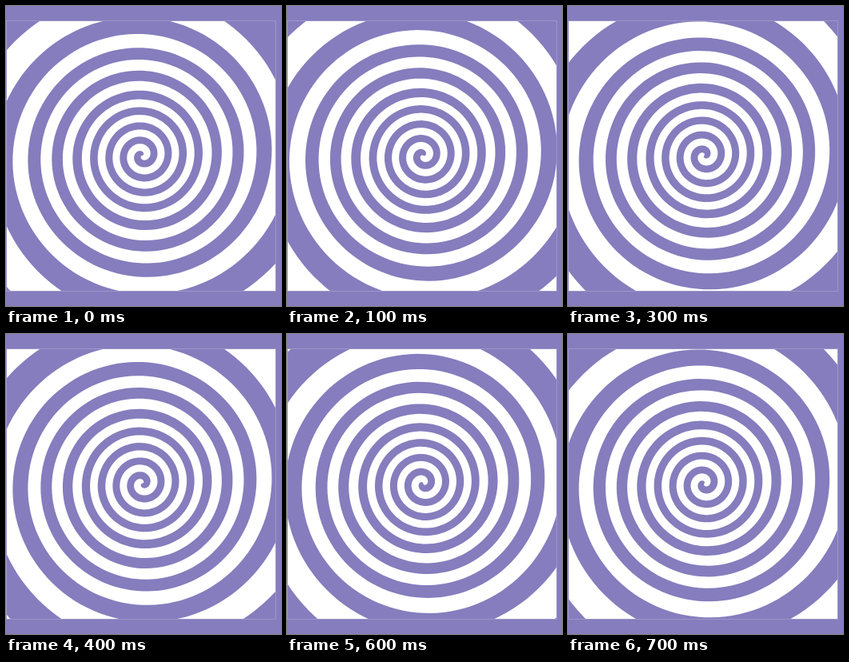
An HTML page with a canvas for the animation above (800 ms loop, 344 px wide and 375 px high).

```html
<!DOCTYPE html>
<html lang="en">
<head>
<meta charset="utf-8">
<title>Spiral</title>
<style>
  html, body { margin: 0; height: 100%; overflow: hidden; background: #857dbd; }
  canvas { display: block; }
</style>
</head>
<body>
<canvas id="stage" width="344" height="375"></canvas>
<script>
const ctx = document.getElementById('stage').getContext('2d');
const PURPLE = '#857dbd', LINE = '#9d97c8';
const CX = 170.4, CY = 186.9, LOOP = 800, STEP = 100, END = 17;

// Radius of the spiral edge after each half turn
const radii = [0, 9.9, 18.9, 27.9, 36.9, 46, 55.6, 65.2, 75.5, 87, 99.4,
  113, 127, 142.9, 161.9, 186.3, 224, 278, 340];

// Smooth interpolation between the half-turn radii
function radius(u) {
  const i = Math.min(Math.floor(u), END - 1), f = u - i;
  const a = i ? radii[i - 1] : -radii[1], b = radii[i], c = radii[i + 1], d = radii[i + 2];
  return b + f / 2 * (c - a + f * (2 * a - 5 * b + 4 * c - d + f * (3 * (b - c) + d - a)));
}

function edgePoint(u, turn) {
  const r = radius(u), angle = turn - Math.PI * u;
  ctx.lineTo(CX + r * Math.cos(angle), CY + r * Math.sin(angle));
}

function draw(t) {
  ctx.fillStyle = PURPLE;
  ctx.fillRect(0, 0, 344, 375);
  ctx.save();
  ctx.beginPath();
  ctx.rect(0, 18, 338, 339);
  ctx.clip();
  ctx.fillStyle = '#fff';
  ctx.fillRect(0, 18, 338, 339);

  const turn = Math.PI * (1 + 2 * t), n = END * 60;
  const last = turn - Math.PI * END;
  ctx.beginPath();
  for (let i = 0; i <= n; i++) edgePoint(i / 60, turn);
  ctx.arc(CX, CY, radius(END), last, last + Math.PI);
  for (let i = n; i >= 0; i--) edgePoint(i / 60, turn + Math.PI);
  ctx.fillStyle = PURPLE;
  ctx.fill();
  ctx.restore();

  ctx.strokeStyle = LINE;
  ctx.lineWidth = 1;
  ctx.strokeRect(0.5, 18.5, 337, 338);
}

function tick() {
  const ms = performance.now() % LOOP;
  draw(Math.floor(ms / STEP) * STEP / LOOP);
  requestAnimationFrame(tick);
}
tick();
</script>
</body>
</html>
```
